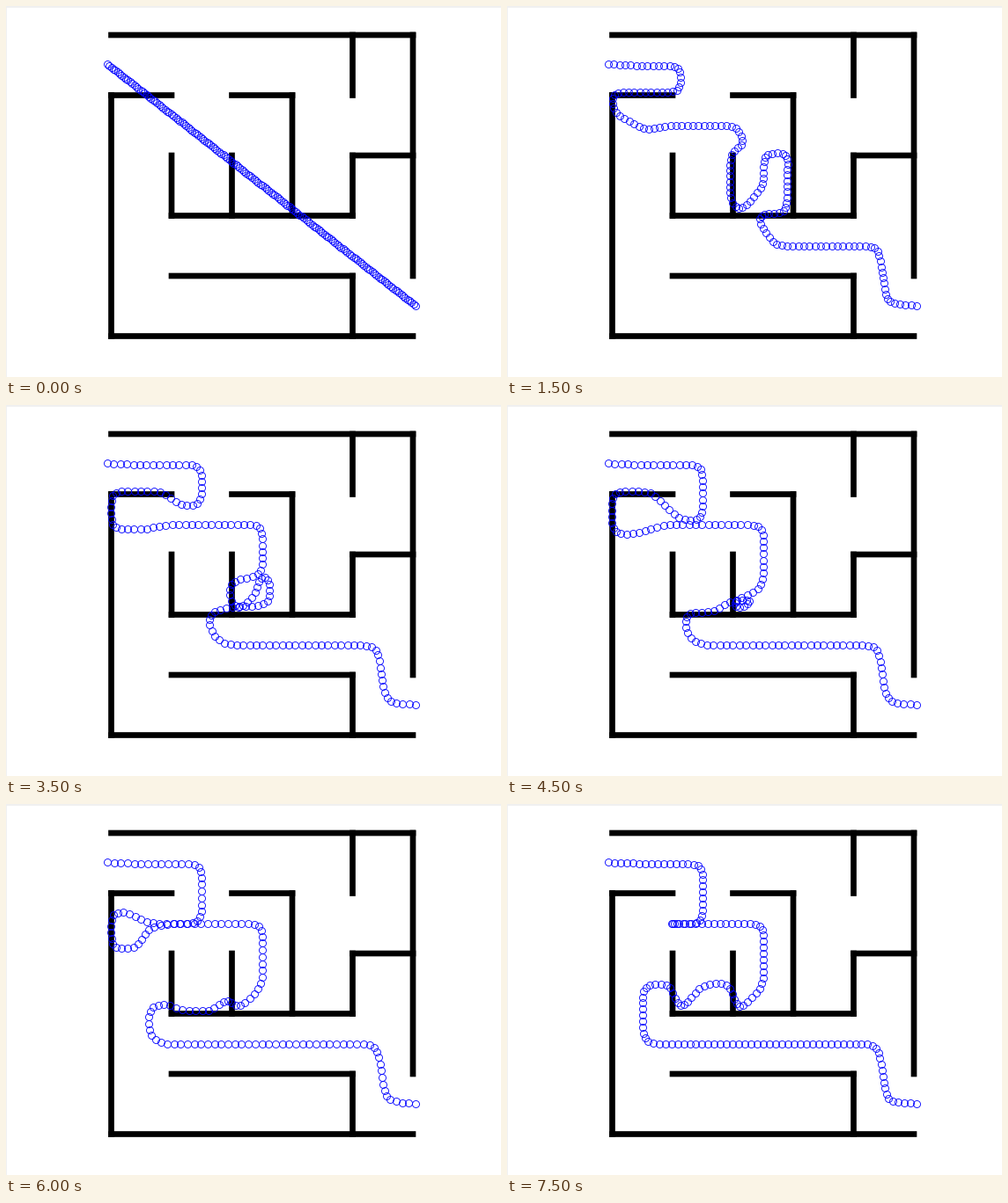
These frames come from a looping animation (562x422 px, 8000 ms). A matplotlib script:

```python
import numpy as np
import matplotlib.pyplot as plt
from matplotlib.animation import FuncAnimation
from matplotlib.patches import Rectangle

W, H = 562, 422
STEP, FRAMES = 500, 16
PX = 0.72                            # points per pixel at 100 dpi
CELL, LEFT, TOP, THICK = 68.5, 119.5, 33, 6.67
COUNT = 150                          # beads on the path
SETTLE = 1.5                         # seconds until the straight line has folded
START, GOAL = (115, 66), (465, 341)

# (line, from, to) in grid units
ROWS = [(0, 0, 5), (1, 0, 1), (1, 2, 3), (2, 4, 5), (3, 1, 4), (4, 1, 4), (5, 0, 5)]
COLS = [(0, 1, 5), (1, 2, 3), (2, 2, 3), (3, 1, 3),
        (4, 0, 1), (4, 2, 3), (4, 4, 5), (5, 0, 4)]


def track(s, *keys):
    """Value at time s from alternating times and values."""
    return np.interp(s, keys[::2], keys[1::2])


def gather(points, target, u):
    """Pull points towards one target."""
    return [(1 - u) * np.array(p) + u * np.array(target) for p in points]


def upper_loop(s):
    """Detour round the left shelf that slips off it and shrinks."""
    turn = track(s, 1.5, 197, 2.5, 222)
    drop = track(s, 2.5, 98, 4.8, 136)
    back = track(s, 4.5, 196, 6, 158)
    shelf = track(s, 2.5, 195, 6, 140)
    top = track(s, 4.5, 98, 6, 122)
    low = track(s, 1.5, 120, 2.5, 136, 4.5, 147, 6, 165)
    loop = [(back, drop), (shelf, top), (119, top), (119, low),
            (150, max(low, 138)), (158, 142), (178, 136)]
    return [(135, 67.5), (turn, 68), (turn, drop),
            *gather(loop, (180, 136), track(s, 6, 0, 7.2, 1))]


def inner_knot(s):
    """Bend at the middle, with a knot that tightens in the pocket."""
    peg = track(s, 1.5, 166, 2.5, 177, 4.5, 224)
    tight = track(s, 2.5, 0, 4.5, 1)
    gone = track(s, 4.5, 0, 5.5, 1)
    pocket = (263, 235)
    loop = gather([(291, 206), (291, 168), (319, 166), (317, 236)], (281, 220), tight)
    knot = [(253, peg), (253, max(220, peg)), pocket, *loop]
    return [(track(s, 1.5, 262, 2.5, 291), 136),
            (track(s, 1.5, 270, 2.5, 291), track(s, 1.8, 158, 4.2, 208)),
            *gather(knot, pocket, gone)]


def lower_sweep(s):
    """Strand dragged left along the floor, over the wall end and back."""
    turn = track(s, 1.5, 286, 4.5, 202, 6, 162, 7.5, 154)
    lift = track(s, 5, 238, 6, 226, 7.5, 203)
    return [(max(turn, 251), track(s, 2.5, 236, 4.5, 223, 6, 218, 7.5, 203)),
            (max(turn, track(s, 6, 236, 7.5, 221)), track(s, 6, 236, 7.5, 205)),
            (max(turn, 197), 235),
            (max(turn, 184), lift),
            (turn, lift + 3),
            (turn, track(s, 1.5, 247, 7.5, 270)),
            (turn + track(s, 1.5, 18, 7.5, 10), 273),
            (421, 273), (431, 338)]


def spread(corners):
    """Evenly spaced beads along a polyline with softened corners."""
    p = np.array(corners, float)
    dist = np.r_[0, np.cumsum(np.hypot(*np.diff(p, axis=0).T))]
    at = np.linspace(0, dist[-1], COUNT)
    q = np.column_stack([np.interp(at, dist, p[:, k]) for k in (0, 1)])
    for _ in range(3):
        q[1:-1] = (q[:-2] + 2 * q[1:-1] + q[2:]) / 4
    return q


def path_at(s):
    folded = spread([START, *upper_loop(s), *inner_knot(s), *lower_sweep(s), GOAL])
    rest = max(0, 1 - s / SETTLE) ** 2
    return rest * np.linspace(START, GOAL, COUNT) + (1 - rest) * folded


fig = plt.figure(figsize=(W / 100, H / 100), dpi=100, facecolor="white")
ax = fig.add_axes([0, 0, 1, 1])
ax.set(xlim=(0, W), ylim=(H, 0))
ax.axis("off")


def box(x, y, w, h, color="black"):
    ax.add_patch(Rectangle((x, y), w, h, fc=color, lw=0, snap=False))


def wall(col, row, across, down):
    box(LEFT + col * CELL - THICK / 2, TOP + row * CELL - THICK / 2,
        across * CELL + THICK, down * CELL + THICK)


box(0, 0, W, 2, "#f0f0f0")
box(0, 0, 1, H, "#f0f0f0")
for line, a, b in ROWS:
    wall(a, line, b - a, 0)
for line, a, b in COLS:
    wall(line, a, 0, b - a)

beads, = ax.plot([], [], "o", ms=8 * PX, mfc="none", mec="blue",
                 mew=0.85 * PX, zorder=5, clip_on=False)


def draw(i):
    beads.set_data(*path_at(i * STEP / 1000).T)
    return beads,


anim = FuncAnimation(fig, draw, frames=FRAMES, interval=STEP, repeat=True,
                     repeat_delay=0, blit=False)
plt.show()
```
